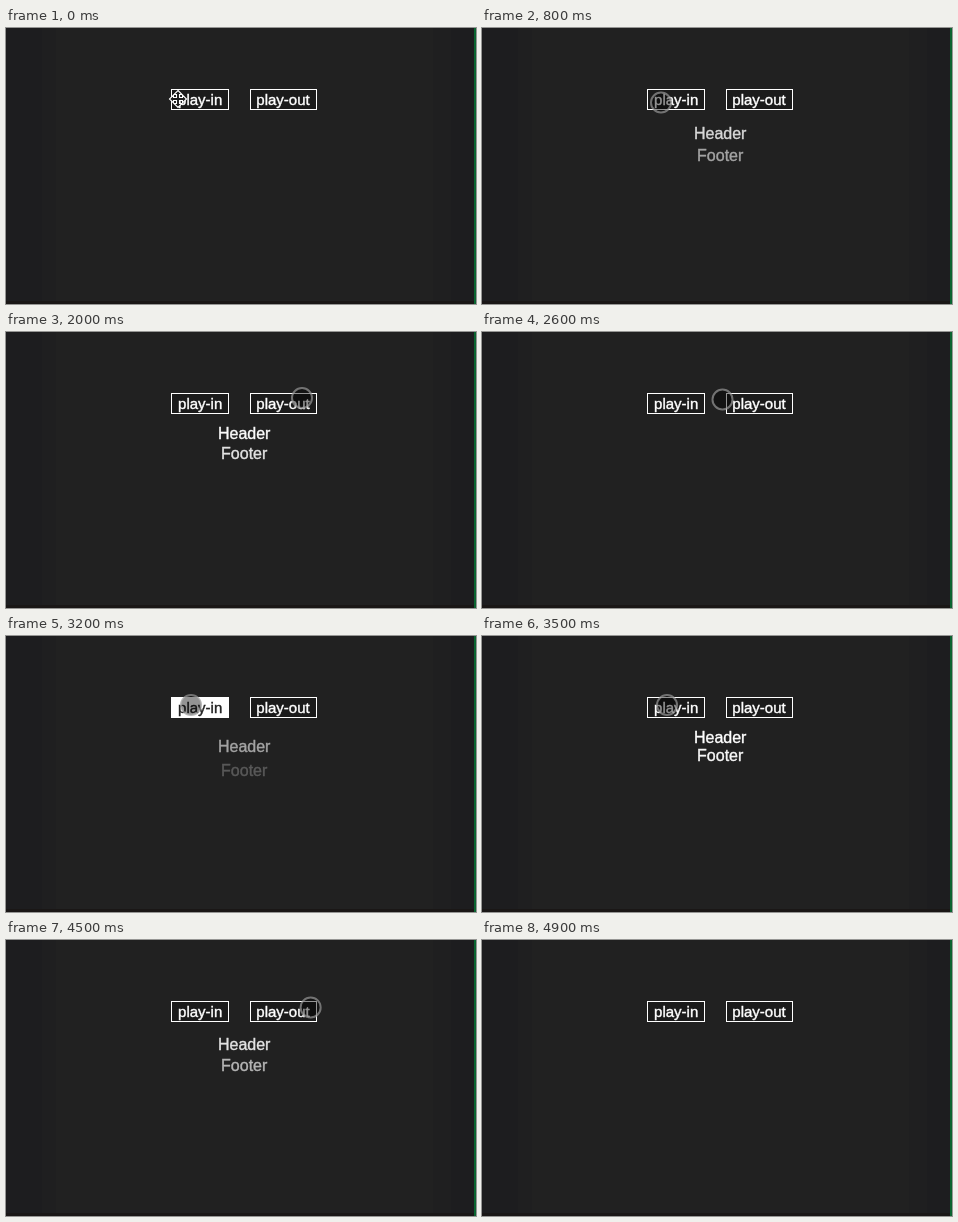
An HTML page that plays this animation: 470x276 px, repeating every 5600 ms.

```html
<!DOCTYPE html>
<html lang="en">
<head>
<meta charset="utf-8">
<title>play-in / play-out</title>
<style>
  html, body { margin: 0; width: 100%; height: 100%; overflow: hidden; background: #1d1d1f; }
  svg { display: block; width: 470px; height: 276px; }
  text {
    font-family: "Liberation Sans", Arial, sans-serif;
    fill: #fff; stroke: #fff; stroke-width: .4px;
    text-anchor: middle;
  }
  .button text { font-size: 15px; }
  .button rect { fill: #1b1b1b; stroke: #fff; }
  .button.pressed rect { fill: #fff; }
  .button.pressed text { fill: #212121; stroke: #212121; }
  .line { font-size: 16px; }
</style>
</head>
<body>
<svg viewBox="0 0 470 276">
  <rect width="470" height="276" fill="#1d1d1f"/>
  <rect x="36" width="409" height="276" fill="#1f1f20"/>
  <rect x="50" width="377" height="276" fill="#212121"/>
  <rect y="273" width="470" height="3" fill="#1a1716"/>
  <rect x="468" width="2" height="276" fill="#0a6430"/>

  <g class="button" id="playIn">
    <rect x="165.5" y="61.5" width="57" height="20"/>
    <text x="194.2" y="77">play-in</text>
  </g>
  <g class="button" id="playOut">
    <rect x="244.5" y="61.5" width="66" height="20"/>
    <text x="277" y="77">play-out</text>
  </g>

  <text class="line" id="header" x="238.2" y="106.8">Header</text>
  <text class="line" id="footer" x="238.2" y="124.2">Footer</text>

  <path id="mover" fill="#1b1b1b" stroke="#fff" stroke-width="1.1" transform="translate(172 71)"
    d="M0-8.5 4-4.5H1.5V-1.5H4.5V-4L8.5 0 4.5 4V1.5H1.5V4.5H4L0 8.5-4 4.5H-1.5V1.5H-4.5V4L-8.5 0-4.5-4V-1.5H-1.5V-4.5H-4Z"/>
  <circle id="ring" r="10" fill="#000" fill-opacity=".42" stroke="#999" stroke-opacity=".7" stroke-width="2"/>
</svg>
<script>
const LOOP = 5600, STEP = 100;
const DURATION = 450, STAGGER = 100, TRAVEL = 21;
const $ = id => document.getElementById(id);
const clamp = v => Math.min(1, Math.max(0, v));
const within = (t, from, length) => t >= from && t < from + length;

// The header enters first, the footer leaves first.
const cycles = [{ enter: 540, leave: 1838 }, { enter: 3040, leave: 4238 }];

const pointerStart = { x: 177, y: 71 };
const moves = [
  { from: 300, to: 400, x: 179, y: 74.5 },
  { from: 1100, to: 1400, x: 296, y: 66 },
  { from: 2400, to: 3000, x: 185, y: 69 },
  { from: 3600, to: 4100, x: 297, y: 71, sag: 9 },
  { from: 4300, to: 4800, x: 310, y: 65 }
];

// Quadratic ease-out in, and the same curve reversed on the way out.
function placeLine(id, { enter, leave }, t, enterDelay, leaveDelay) {
  const entering = clamp((t - enter - enterDelay) / DURATION);
  const leaving = clamp((t - leave - leaveDelay) / DURATION);
  const amount = 1 - (1 - entering) ** 2 - leaving ** 2;
  $(id).setAttribute("opacity", amount);
  $(id).setAttribute("transform", `translate(0 ${TRAVEL * (1 - amount)})`);
}

function pointerAt(t) {
  let { x, y } = pointerStart;
  for (const move of moves) {
    const k = clamp((t - move.from) / (move.to - move.from));
    const eased = Math.sin(k * Math.PI / 2);
    x += (move.x - x) * eased;
    y += (move.y - y) * eased + (move.sag || 0) * Math.sin(k * Math.PI);
  }
  return [x, y];
}

function draw(t) {
  const cycle = cycles[t < LOOP / 2 ? 0 : 1];
  placeLine("header", cycle, t, 0, STAGGER);
  placeLine("footer", cycle, t, STAGGER, 0);
  $("playIn").classList.toggle("pressed", within(t, cycle.enter, 200));
  $("playOut").classList.toggle("pressed", within(t, cycle.leave, 120));

  $("mover").style.display = t < 100 ? "" : "none";
  $("ring").style.display = within(t, 100, 4800) ? "" : "none";
  $("ring").setAttribute("transform", `translate(${pointerAt(t)})`);
}

const start = performance.now();
function tick() {
  const t = (performance.now() - start) % LOOP;
  draw(Math.floor(t / STEP) * STEP);
  requestAnimationFrame(tick);
}
tick();
</script>
</body>
</html>
```
